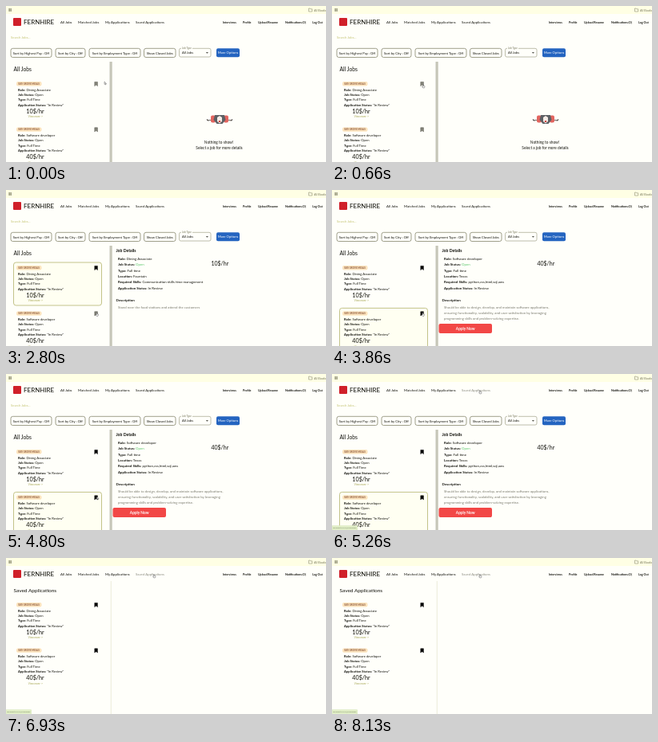
Animation, 400 px wide and 196 px high, one loop 8400 ms. Source, as an HTML page:

```html
<!DOCTYPE html>
<html lang="en">
<head>
<meta charset="utf-8">
<title>Job board</title>
<style>
html, body { margin: 0; width: 100%; height: 100%; overflow: hidden; background: #fffffa; }
svg { display: block; width: 100vw; height: 100vh; }
text { font-family: Lato, "Open Sans", sans-serif; white-space: pre; }
</style>
</head>
<body>
<svg id="stage" viewBox="0 0 400 196" preserveAspectRatio="none"></svg>
<script>
const INK = '#11110c', PAGE = '#fffffa', LOOP = 8400;

const text = (x, y, size, str, o = {}) =>
  `<text x="${x}" y="${y}" font-size="${size}" fill="${o.fill || INK}" font-weight="${o.bold ? 700 : 400}"
    text-anchor="${o.mid ? 'middle' : 'start'}" ${o.id ? `id="${o.id}"` : ''}>${str}</text>`;
const rect = (x, y, w, h, fill, r = 0, stroke = 'none', id = '') =>
  `<rect x="${x}" y="${y}" width="${w}" height="${h}" rx="${r}" fill="${fill}" stroke="${stroke}" stroke-width=".7" id="${id}"/>`;
const path = (d, fill, stroke = 'none', width = .6, id = '') =>
  `<path d="${d}" fill="${fill}" stroke="${stroke}" stroke-width="${width}" id="${id}"/>`;
const field = (x, y, label, value, size = 4.2, fill = INK) =>
  `<text x="${x}" y="${y}" font-size="${size}" fill="${INK}"><tspan font-weight="700">${label}:</tspan><tspan fill="${fill}"> ${value}</tspan></text>`;
const group = (id, ...parts) => `<g id="${id}">${parts.join('')}</g>`;

const jobs = [
  { role: 'Dining Associate', pay: '10$/hr', place: 'Fountain',
    skills: 'Communication skills time management',
    about: ['Stand near the food stations and attend the customers'] },
  { role: 'Software developer', pay: '40$/hr', place: 'Texas',
    skills: 'python,css,html,sql,aws',
    about: ['Should be able to design, develop, and maintain software applications,',
      'ensuring functionality, scalability, and user satisfaction by leveraging',
      'programming skills and problem-solving expertise.'] }
];

function card(job, y, id) {
  return group(id,
    rect(9.5, y, 110, 54, PAGE, 3, 'none', id + 'Box'),
    rect(13, y + 4, 31.5, 5.4, '#fbe3bd', 2),
    text(28.7, y + 7.8, 2.9, 'BAY GROVE MEALS', { mid: 1, bold: 1, fill: '#8f5a3c' }),
    path(`M110.8 ${y + 4.4}h3.6v5.2l-1.8 -1.5l-1.8 1.5z`, '#85857a', '#55554c', .5, id + 'Mark'),
    field(15, y + 15.5, 'Role', job.role),
    field(15, y + 22, 'Job Status', 'Open'),
    field(15, y + 28.4, 'Type', 'Full Time'),
    field(15, y + 34.8, 'Application Status', '"In Review"'),
    text(36.5, y + 44, 7.2, job.pay, { mid: 1 }),
    text(37, y + 49.3, 3.1, 'View more -&gt;', { mid: 1, fill: '#a0a04c' }));
}

function detail(job, id, canApply) {
  const facts = [['Role', job.role], ['Job Status', 'Open', '#55c566'], ['Type', 'Full time'],
    ['Location', job.place], ['Required Skills', job.skills], ['Application Status', 'In Review']];
  return group(id,
    text(137.5, 78.4, 5.1, 'Job Details', { bold: 1 }),
    ...facts.map(([label, value, fill], i) => field(140, 87.8 + i * 7.4, label, value, 4.35, fill)),
    text(267.3, 94.6, 7, job.pay, { mid: 1 }),
    text(137.5, 140, 4.5, 'Description', { bold: 1 }),
    ...job.about.map((line, i) => text(140, 149.4 + i * 6.6, 4.3, line, { fill: '#7b7b70' })),
    canApply ? rect(133.5, 168, 66.5, 12, '#f24746', 2) +
      text(166.7, 175.8, 4.8, 'Apply Now', { mid: 1, bold: 1, fill: '#fff' }) : '');
}

const button = (x, w, label) =>
  rect(x, 53.3, w, 11.2, 'none', 2.5, '#77775c') + text(x + w / 2, 60.5, 4.2, label, { mid: 1 });

const header = group('header',
  rect(0, 0, 400, 10, '#ffffe4'),
  [0, 1, 2, 3].map(i => rect(3.4 + i % 2 * 2, 3.2 + (i >> 1) * 2, 1.5, 1.5, '#77775c')).join(''),
  path('M378.5 3h1.6l.6 .8h2v3.2h-4.2z', 'none', '#77775c', .5),
  text(385, 6.5, 3.8, 'All Bookmarks', { fill: '#77775c' }),
  rect(9, 15, 10, 10, '#d0202a', 1),
  text(22, 22.8, 8, 'FERNHIRE'),
  [[68, 'All Jobs'], [90, 'Matched Jobs'], [124, 'My Applications'], [162, 'Saved Applications', 'savedLink']]
    .map(([x, s, id]) => text(x, 21.7, 4.35, s, { id })).join(''),
  [[271, 'Interviews'], [296, 'Profile'], [315, 'Upload Resume'], [349, 'Notifications (0)'], [383, 'Log Out']]
    .map(([x, s]) => text(x, 21.5, 3.6, s, { bold: 1 })).join(''));

const board = group('board',
  text(6, 41.3, 4.2, 'Search Jobs...', { fill: '#c4c475' }),
  button(6, 51, 'Sort by Highest Pay : Off'),
  button(62, 37, 'Sort by City : Off'),
  button(104, 64, 'Sort by Employment Type : Off'),
  button(172.5, 39.5, 'Show Closed Jobs'),
  rect(216.5, 53.3, 39.5, 10.7, 'none', 2, '#a3a38c'),
  rect(219, 52, 14, 2.5, PAGE),
  text(220, 54.4, 3.1, 'Job Type', { fill: '#77775c' }),
  text(220, 60.4, 4.2, 'All Jobs'),
  path('M249.8 58h3.2l-1.6 1.7z', '#55554c'),
  rect(263, 53.3, 29, 10.9, '#2464c0', 2),
  text(277.5, 60.4, 4.2, 'More Options', { mid: 1, fill: '#fff' }),
  text(9.5, 81.6, 6.7, 'All Jobs'),
  rect(129.5, 70, 3.2, 126, '#c6c6b8'),
  card(jobs[0], 91, 'first'),
  card(jobs[1], 148.4, 'second'),
  group('empty',
    path('M251 143.4h32M251 142l2 2.8M283 142l-2 2.8', 'none', '#4b4440', .8),
    rect(256, 137.5, 6, 9, '#e2655f', 2),
    rect(272, 137.5, 6, 9, '#e2655f', 2),
    path('M261 137h12l1.5 6l-4 5h-7l-4 -5z', '#5d6064'),
    path('M264 140l3 -2l3 2v5l-3 2.5l-3 -2.5z', '#f6ece6'),
    rect(265.7, 144, 2.6, 2, '#c73c37', 1),
    text(266, 172.7, 4.8, 'Nothing to show!', { mid: 1 }),
    text(266.5, 180.2, 4.8, 'Select a job for more details', { mid: 1 })),
  detail(jobs[0], 'detail1', false),
  detail(jobs[1], 'detail2', true));

const saved = group('saved',
  text(9.5, 42.6, 6.5, 'Saved Applications'),
  rect(130.8, 29, .8, 167, '#e6e6d0'),
  card(jobs[0], 52, 'kept1'),
  card(jobs[1], 109.4, 'kept2'));

const status = group('status',
  rect(-1, 190.3, 33, 7, '#e0edc6', 1),
  text(1.2, 194.3, 2.6, 'localhost:5173/savedjobs', { fill: '#6f8052' }));

const cursor = group('cursor',
  path('M0 0v3.4l.8 -.7l.6 1.3l.6 -.3l-.6 -1.2h1.1z', '#fff', '#333', .4, 'arrow'),
  path('M-.4 .2q.4 -.5 .8 0v1.5l1.5 .4v1.1l-.5 1.2h-1.7l-1.1 -1.5l.4 -.4l.6 .4z', '#fff', '#333', .4, 'hand'));

document.getElementById('stage').innerHTML = header + board + saved + status + cursor;

const $ = id => document.getElementById(id);
const toggle = (id, on) => $(id).style.display = on ? '' : 'none';

// Pointer stops: time, x, y
const stops = [[0, 123, 95], [60, 123, 95], [600, 114, 98.5], [2600, 114, 98.5], [2800, 113.5, 154],
  [4800, 113.5, 154], [5200, 185, 20.5], [LOOP, 185, 20.5]];

function pointer(t) {
  const i = stops.findIndex(s => s[0] > t);
  const [t0, x0, y0] = stops[i - 1], [t1, x1, y1] = stops[i];
  const u = (t - t0) / (t1 - t0), e = u * u * (3 - 2 * u);
  return [x0 + (x1 - x0) * e, y0 + (y1 - y0) * e];
}

function mark(id, on) {
  $(id + 'Mark').setAttribute('fill', on ? '#000' : '#85857a');
  $(id + 'Mark').setAttribute('stroke', on ? '#000' : '#55554c');
}
function select(id, on) {
  $(id + 'Box').setAttribute('fill', on ? '#fffff2' : PAGE);
  $(id + 'Box').setAttribute('stroke', on ? '#a9a95c' : 'none');
}

function draw(t) {
  const first = t >= 1600 && t < 3800, second = t >= 3800, hover = t >= 5130, done = t >= 5860;
  toggle('board', !done);
  toggle('saved', done);
  toggle('empty', t < 1600);
  toggle('detail1', first);
  toggle('detail2', second);
  toggle('status', hover);
  select('first', first);
  select('second', second);
  mark('first', t >= 1600);
  mark('second', t >= 3860);
  mark('kept1', true);
  mark('kept2', true);
  $('savedLink').setAttribute('fill', hover ? '#8b8b80' : INK);
  const [x, y] = pointer(t);
  $('cursor').setAttribute('transform', `translate(${x} ${y})`);
  const overLink = (t >= 530 && t < 2600) || (t >= 2790 && t < 4800) || hover;
  toggle('hand', overLink);
  toggle('arrow', !overLink);
}

const start = performance.now();
function tick() {
  const t = (performance.now() - start) % LOOP;
  draw(Math.floor(Math.floor((t + 7) * .015) / .15) * 10);
  requestAnimationFrame(tick);
}
tick();
</script>
</body>
</html>
```
